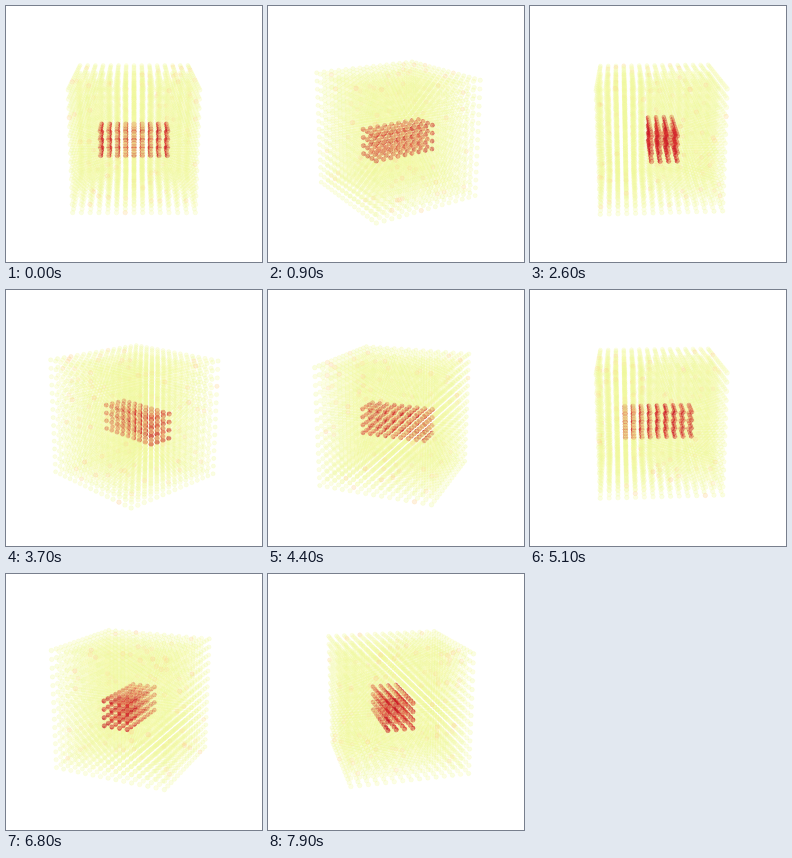
Recreate the animation shown at these times as an HTML page with a canvas. Size 256x256 px, loop 8000 ms.

```html
<!DOCTYPE html>
<html lang="en">
<head>
<meta charset="utf-8">
<title>Rotating dot lattice</title>
<style>
  html, body { margin: 0; width: 100%; height: 100%; overflow: hidden; background: #fff; }
  canvas { display: block; width: 256px; height: 256px; }
</style>
</head>
<body>
<canvas id="stage" width="256" height="256"></canvas>
<script>
const ctx = document.getElementById('stage').getContext('2d');
const STEP_MS = 100, STEPS = 80, TURN = Math.PI / 50;
const HALF = 7, GAP = 8.2, GAP_Z = 8.4;
const SIN = 0.3, COS = Math.sqrt(1 - SIN * SIN), DIST = 580;
const CX = 128, CY = 128.3, RADIUS = 2.1, RIM = 0.7;

let seed = 7;
function random() {
  seed = (seed * 16807) % 2147483647;
  return seed / 2147483647;
}

const mix = (a, b, t) => a.map((v, i) => Math.round(v + (b[i] - v) * t));

function dotColor(inCore) {
  const t = random();
  if (inCore) return `rgba(${mix([198, 24, 38], [222, 60, 50], t)},0.72)`;
  if (t > 0.97) return `rgba(${mix([253, 222, 140], [252, 196, 130], random())},0.28)`;
  return `rgba(${mix([236, 246, 150], [246, 250, 166], t)},0.27)`;
}

// Cubic lattice with a 9 x 4 x 4 red core
const dots = [];
for (let x = -HALF; x <= HALF; x++)
  for (let y = -HALF; y <= HALF; y++)
    for (let z = -HALF; z <= HALF; z++) {
      const inCore = Math.abs(x) <= 4 && y >= -1 && y <= 2 && z >= -2 && z <= 1;
      dots.push({ x: x * GAP, y: y * GAP, z: z * GAP_Z, color: dotColor(inCore) });
    }

function draw(angle) {
  const s = Math.sin(angle), c = Math.cos(angle);
  for (const d of dots) {
    const front = d.y * c - d.x * s;
    d.depth = front * COS + d.z * SIN;
    d.scale = DIST / (DIST - d.depth);
    d.px = CX + (d.x * c + d.y * s) * d.scale;
    d.py = CY + (front * SIN - d.z * COS) * d.scale;
  }
  dots.sort((a, b) => a.depth - b.depth);
  ctx.fillStyle = '#fff';
  ctx.fillRect(0, 0, 256, 256);
  ctx.lineWidth = RIM;
  for (const d of dots) {
    ctx.fillStyle = ctx.strokeStyle = d.color;
    ctx.beginPath();
    ctx.arc(d.px, d.py, RADIUS * d.scale, 0, 2 * Math.PI);
    ctx.fill();
    ctx.stroke();
  }
}

let start, shown = -1;
function tick(now) {
  start ??= now;
  const step = Math.floor((now - start) / STEP_MS) % STEPS;
  if (step !== shown) draw((shown = step) * TURN);
  requestAnimationFrame(tick);
}
requestAnimationFrame(tick);
</script>
</body>
</html>
```
